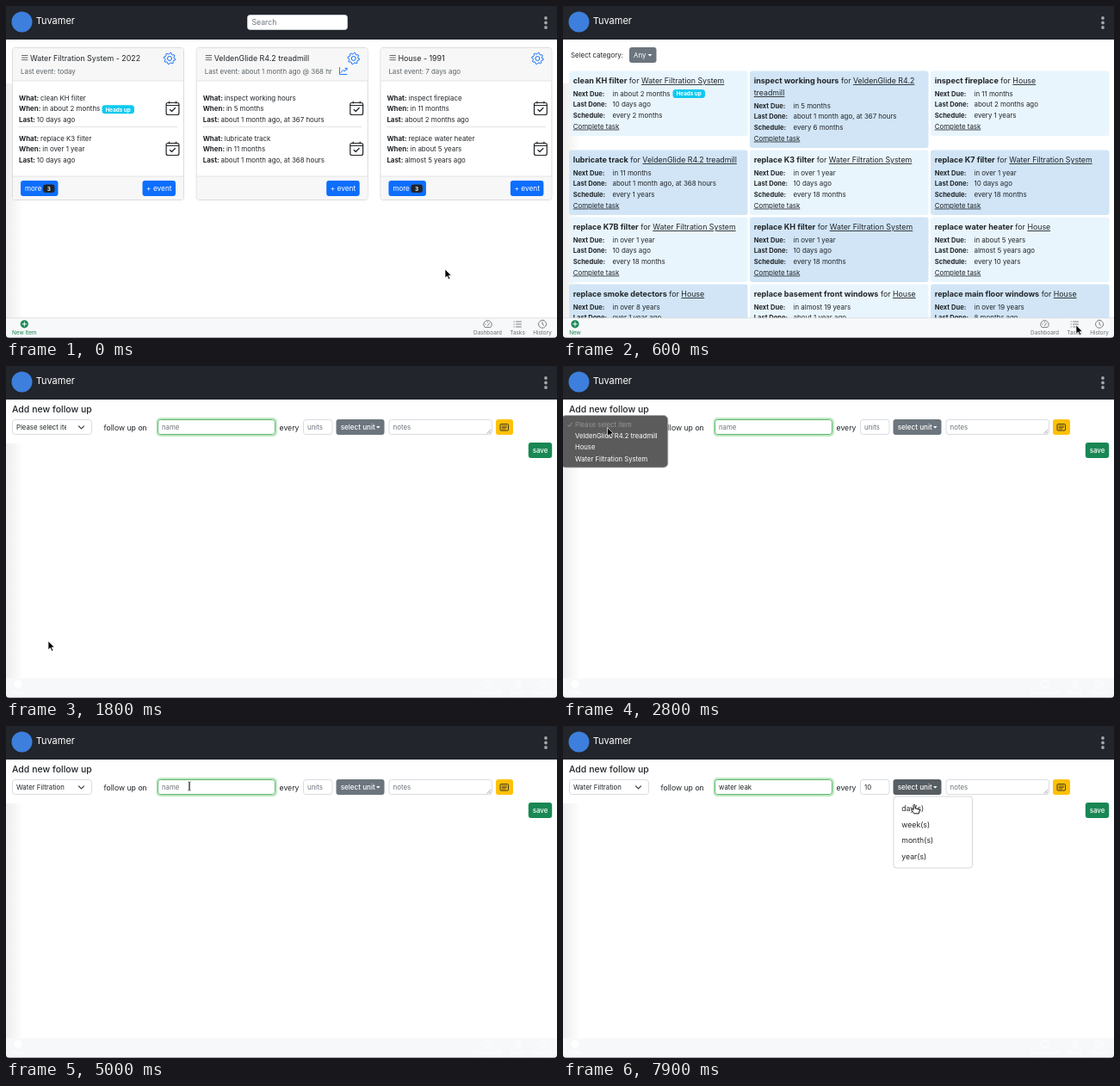
Animation of 640x386 px, one loop 8 s. Source, as an HTML page:

```html
<!DOCTYPE html>
<html lang="en">
<head>
<meta charset="utf-8">
<title>Home upkeep tracker</title>
<style>
html, body { margin: 0; width: 100%; height: 100%; overflow: hidden; background: #fff; }
svg { display: block; width: 640px; height: 386px; }
text { font-family: Inter, 'Noto Sans', sans-serif; white-space: pre; }
.b { font-weight: 700; }
.u { text-decoration: underline; text-decoration-thickness: .6px; text-decoration-color: #6b7681; }
</style>
</head>
<body>
<svg id="stage" viewBox="0 0 640 386" xmlns="http://www.w3.org/2000/svg"></svg>
<script>
const INK = '#212529', GREY = '#6c757d', BLUE = '#0d6efd', GREEN = '#198754';
const SMALL = 7.9, BASE = 8.7, LOOP = 8000, STEP = 100;
const MILL = 'VeldenGlide R4.2 treadmill', WATER = 'Water Filtration System';

// ---- drawing helpers ----
const rect = (x, y, w, h, fill, rx = 0, more = '') =>
  `<rect x="${x}" y="${y}" width="${w}" height="${h}" rx="${rx}" fill="${fill}" ${more}/>`;
const box = (x, y, w, h, line = '#ced4da', fill = '#fff', more = '') =>
  rect(x + .5, y + .5, w - 1, h - 1, fill, 3, `stroke="${line}" stroke-width=".8" ${more}`);
const text = (x, y, s, size = SMALL, fill = INK, more = '') =>
  `<text x="${x}" y="${y}" font-size="${size}" fill="${fill}" ${more}>${s}</text>`;
const path = (d, color = INK, w = 1, more = '') =>
  `<path d="${d}" fill="none" stroke="${color}" stroke-width="${w}" stroke-linecap="round" stroke-linejoin="round" ${more}/>`;
const group = (id, body, more = '') => `<g id="${id}" ${more}>${body}</g>`;
const bold = (s, size = SMALL) => `<tspan class="b" font-size="${size}">${s}</tspan>`;
const link = s => `<tspan class="u">${s}</tspan>`;
const mid = 'text-anchor="middle"';
const badge = (x, y) => rect(x, y, 37.5, 10, '#0dcaf0', 3.5) +
  text(x + 18.7, y + 7.4, 'Heads up', 6.3, '#fff', mid + ' font-weight="700"');

function gear(cx, cy) {
  let d = '';
  for (let i = 0; i < 32; i++) {
    const r = i % 4 < 2 ? 6.7 : 5.2, a = (i + .5) * Math.PI / 16;
    d += (i ? 'L' : 'M') + (cx + r * Math.cos(a)).toFixed(2) + ' ' + (cy + r * Math.sin(a)).toFixed(2);
  }
  return path(d + 'Z', BLUE) + `<circle cx="${cx}" cy="${cy}" r="2.5" fill="none" stroke="${BLUE}"/>`;
}

const calendar = (x, y) => rect(x + .6, y + 1.5, 14.8, 14, 'none', 2, `stroke="${INK}" stroke-width="1.2"`) +
  path(`M${x + 1} ${y + 4.5}h14M${x + 4} ${y}v2M${x + 12} ${y}v2M${x + 5} ${y + 9.5}l2 2l4-4`, INK, 1.2);

// ---- dashboard ----
function itemCard(x, title, sub, jobs, more) {
  let s = box(x, 48, 200, 178, '#d4d4d4') +
    rect(x + 1, 49, 198, 38, '#f7f7f7', 2) + rect(x + 1, 198, 198, 27, '#f7f7f7', 2) +
    path(`M${x + 1} 87h198M${x + 1} 198h198`, '#dcdcdc', .8) +
    path(`M${x + 11.5} 57.5h6.5m-6.5 2.6h6.5m-6.5 2.6h6.5`, '#444', .8) +
    text(x + 21, 63.5, title, 8.9) + text(x + 10, 79, sub, SMALL, '#5c6368') + gear(x + 183, 61);
  jobs.forEach((job, i) => {
    const y = 110 + i * 47;
    ['What: ', 'When: ', 'Last: '].forEach((label, k) =>
      s += text(x + 8, y + k * 12.4, bold(label) + job[k]));
    s += calendar(x + 178.5, y + 1);
  });
  s += path(`M${x + 8} 140.5h184`, '#dcdcdc', .8);
  if (more) s += rect(x + 10, 203, 43.5, 18, BLUE, 3) + text(x + 15, 215, 'more', 8, '#fff') +
    rect(x + 36, 207.5, 13.5, 9.5, INK, 3) + text(x + 42.7, 214.7, '3', 6.4, '#fff', mid + ' class="b"');
  return s + rect(x + 151.5, 203, 38.5, 18, BLUE, 3) + text(x + 170.8, 215, '+ event', 8.3, '#fff', mid);
}

const dashboard =
  itemCard(7, WATER + ' - 2022', 'Last event: today', [
    ['clean KH filter', 'in about 2 months', '10 days ago'],
    ['replace K3 filter', 'in over 1 year', '10 days ago']], true) + badge(111.5, 115.3) +
  itemCard(220.7, MILL, 'Last event: about 1 month ago @ 368 hr', [
    ['inspect working hours', 'in 5 months', 'about 1 month ago, at 367 hours'],
    ['lubricate track', 'in 11 months', 'about 1 month ago, at 368 hours']], false) +
  path('M387.5 71.5v8h8.5M389 77.5l2.4-3l1.8 1.4l2.8-3.6m-2 0h2v2', BLUE, .9) +
  itemCard(434.4, 'House - 1991', 'Last event: 7 days ago', [
    ['inspect fireplace', 'in 11 months', 'about 2 months ago'],
    ['replace water heater', 'in about 5 years', 'almost 5 years ago']], true) +
  box(280, 10, 117, 18) + text(285.5, 22, 'Search', BASE, GREY);

// ---- task list ----
const tasks = [
  ['clean KH filter', WATER, 'in about 2 months', '10 days ago', 'every 2 months'],
  ['inspect working hours', MILL, 'in 5 months', 'about 1 month ago, at 367 hours', 'every 6 months'],
  ['inspect fireplace', 'House', 'in 11 months', 'about 2 months ago', 'every 1 years'],
  ['lubricate track', MILL, 'in 11 months', 'about 1 month ago, at 368 hours', 'every 1 years'],
  ['replace K3 filter', WATER, 'in over 1 year', '10 days ago', 'every 18 months'],
  ['replace K7 filter', WATER, 'in over 1 year', '10 days ago', 'every 18 months'],
  ['replace K7B filter', WATER, 'in over 1 year', '10 days ago', 'every 18 months'],
  ['replace KH filter', WATER, 'in over 1 year', '10 days ago', 'every 18 months'],
  ['replace water heater', 'House', 'in about 5 years', 'almost 5 years ago', 'every 10 years'],
  ['replace smoke detectors', 'House', 'in over 8 years', 'over 1 year ago', 'every 10 years'],
  ['replace basement front windows', 'House', 'in almost 19 years', 'about 1 year ago', 'every 20 years'],
  ['replace main floor windows', 'House', 'in over 19 years', '8 months ago', 'every 20 years']];

function taskCard([name, item, ...vals], i) {
  const x = 7 + (i % 3) * 210, row = Math.floor(i / 3), y = [75.5, 167.5, 245.5, 323.5][row];
  const wrap = i === 1, drop = wrap ? 14 : 0, at = y + 14.5;
  const parts = wrap ? [item.replace(' treadmill', ''), 'treadmill'] : [item];
  let s = rect(x, y, 207.5, 75.5 + drop, i % 2 ? '#d1e5f6' : '#e9f5fc', 3) +
    text(x + 4.7, at, bold(name, 9.05) + ' for ' + link(parts[0]), 8.8);
  if (wrap) s += text(x + 4.7, at + 14, link(parts[1]), 8.8);
  ['Next Due:', 'Last Done:', 'Schedule:'].forEach((label, k) => {
    const ly = at + drop + 15 + k * 12.4;
    s += text(x + 4.7, ly, label, 7.6, INK, 'class="b"') + text(x + 50.5, ly, vals[k]);
  });
  return s + text(x + 4.7, at + drop + 52.6, link('Complete task'));
}

const taskPage = text(9, 60, 'Select category:') + rect(77, 48, 31.5, 18, GREY, 3) +
  text(82, 60, 'Any', SMALL, '#fff') + '<path d="M98.5 56h5l-2.5 2.6z" fill="#fff"/>' +
  tasks.map(taskCard).join('') + badge(127.5, 97);

// ---- form ----
const form = text(7, 53.8, 'Add new follow up', 10.5, INK, 'font-weight="500"') +
  rect(5.5, 60.5, 96, 21, 'none', 4.5, `id="selRing" stroke="${BLUE}" stroke-width="3"`) +
  box(7, 62, 93, 18) + text(12, 74, '', 7.8, INK, 'id="selText" clip-path="url(#selClip)"') +
  path('M84.5 69.8l3 3l3-3', '#343a40', 1.2) +
  text(113.5, 74.5, 'follow up on', BASE) +
  rect(175.5, 61, 138.5, 20, 'none', 4, 'stroke="#4bbf5b" stroke-opacity=".35" stroke-width="2"') +
  box(176, 62, 137, 18, '#35a548') + text(181, 74, '', 7.8, INK, 'id="name"') +
  rect(0, 66, 1, 10, '#111', 0, 'id="caret"') +
  text(317.5, 74.5, 'every', BASE) +
  rect(344.3, 60.5, 36, 21, 'none', 4.5, `id="unitRing" stroke="${BLUE}" stroke-width="3"`) +
  box(345, 62, 34.5, 18) + text(350, 74, '', SMALL, INK, 'id="units"') +
  rect(383.5, 62, 56, 18, GREY, 3, 'id="unitBtn"') +
  text(388.7, 74, 'select unit', 8.1, '#fff', 'font-weight="500"') + '<path d="M430 70h4.6l-2.3 2.5z" fill="#fff"/>' +
  box(444.5, 62, 120.5, 18) + text(449.5, 74, 'notes', SMALL, GREY) +
  path('M559 78.3l4-4M561.5 78.3l1.6-1.6', '#777', .7) +
  rect(569, 62, 20, 18, '#ffc107', 3) + rect(574, 67.6, 9.5, 7.4, 'none', 1, `stroke="${INK}" stroke-width=".9"`) +
  path('M576 69.8h5.5m-5.5 1.6h5.5m-5.5 1.6h4', INK, .7) +
  rect(606.8, 89, 27.4, 18, GREEN, 3) + text(620.5, 101, 'save', SMALL, '#fff', mid + ' font-weight="500"') +
  group('unitMenu', box(383.5, 81.5, 92.5, 84, '#cfcfcf') +
    ['day(s)', 'week(s)', 'month(s)', 'year(s)'].map((s, i) => text(393.3, 99 + i * 18.5, s, BASE)).join('')) +
  group('popup', rect(-2, 57.5, 123.8, 60.5, '#5b5b5b', 5, 'stroke="#a5a5a5" stroke-width=".8"') +
    rect(2, 0, 117, 13.2, '#ff8a4f', 2.5, 'id="hover"') + path('M5.8 68.6l1.6 2l3-4.6', '#969696', .9) +
    ['Please select item', MILL, 'House', WATER].map((s, i) =>
      text(14, 71 + i * 13.2, s, 7.7, i ? '#fff' : '#969696')).join(''));

// ---- frame around the pages ----
const header = rect(0, 0, 640, 39, '#22252b') + '<circle cx="18.5" cy="18.5" r="12" fill="#3d7fdc"/>' +
  text(34.7, 21.3, 'Tuvamer', 11, '#fff') +
  [14, 19.5, 25].map(y => `<circle cx="627" cy="${y}" r="1.9" fill="#a3a5a8"/>`).join('');

const tab = (x, s, icon) => path(icon, 'currentColor', .9) + text(x, 381.5, s, 6.4, 'currentColor', mid);
const bar = rect(0, 363, 640, 23, '#f7f8f9') + path('M0 362.7h640', '#d9dcde', .8, 'id="barLine"') +
  rect(6.3, 363, 17.4, 21.5, '#e8eefb', 3, 'id="newRing" stroke="#4a78d8" stroke-width="1.5"') +
  group('newTab', '<circle cy="369.8" r="4.6" fill="currentColor"/>' +
    path('M-2.3 369.8h4.6M0 367.5v4.6', '#fff', 1) + text(0, 381.5, '', 6.4, 'currentColor', mid + ' id="newText"')) +
  group('tabs',
    tab(559.5, 'Dashboard', 'M556 373.3a4.6 4.6 0 1 1 7 0zM559.5 371.5l2-2.6M556.8 370h.4M559.5 367.2v.4') +
    tab(594, 'Tasks', 'M592.5 367h6m-6 3h6m-6 3h6M590 367h.4M590 370h.4M590 373h.4') +
    tab(623, 'History', 'M623 365.3a4.5 4.5 0 1 0 .1 0M623 367.5v2.6l1.8 1.2'));

const newMenu = box(7, 316.5, 92.5, 46, '#cfcfcf') + text(17, 333.4, 'Follow up', BASE) + text(17, 352, 'Task', BASE);

const cursors =
  '<path id="arrow" d="M0 0v10.2l2.4-2.2l1.7 3.8l1.7-.8l-1.7-3.6h3.2z" fill="#000" stroke="#fff" stroke-width=".7"/>' +
  '<path id="hand" d="M-1 .6c0-1.6 2-1.6 2 0v3.2l4 .9q1.4.4 1.1 1.9l-.8 3.2h-5.4l-3.2-4c-.6-1.2.7-1.9 1.5-1l.8.8z" fill="#fff" stroke="#000" stroke-width=".9"/>' +
  '<path id="beam" d="M-1.6-5q1.6 0 1.6 1v8q0 1-1.6 1M1.6-5q-1.6 0-1.6 1v8q0 1 1.6 1" fill="none" stroke="#222" stroke-width=".8"/>';

const svg = document.getElementById('stage');
svg.innerHTML = `<defs><linearGradient id="edge"><stop stop-color="#000" stop-opacity=".07"/>
  <stop offset="1" stop-color="#000" stop-opacity="0"/></linearGradient>
  <clipPath id="selClip"><rect x="10" y="62" width="60" height="18"/></clipPath></defs>` +
  rect(0, 0, 640, 386, '#fff') + rect(0, 90, 20, 273, 'url(#edge)') + header +
  group('tasks', taskPage) + group('dash', dashboard) + group('form', form) + bar +
  group('newMenu', newMenu) + path('M0 385.7h640', '#5a5c5f', .6) +
  '<path d="M0 382v4h4q-4 0-4-4zM640 382v4h-4q4 0 4-4z" fill="#111"/>' + group('cursor', cursors);

const el = {};
svg.querySelectorAll('[id]').forEach(n => el[n.id] = n);
const show = (id, o) => { el[id].style.display = o ? '' : 'none'; el[id].style.opacity = +o; };
const set = (id, k, v) => el[id].setAttribute(k, v);

// ---- motion ----
// time, x, y, pointer shape from then on
const route = [
  [0, 510, 306, 'arrow'], [400, 596, 371, 'arrow'], [600, 596, 371, 'arrow'], [1300, 14, 368, 'hand'],
  [1400, 14, 368, 'hand'], [1600, 49, 329, 'hand'], [1700, 49, 329, 'arrow'], [2600, 50, 58, 'arrow'],
  [2800, 51.5, 71.5, 'arrow'], [3100, 50, 80, 'arrow'], [3400, 50, 80, 'arrow'], [3800, 49.5, 107, 'arrow'],
  [3900, 49.5, 107, 'arrow'], [4300, 213, 70, 'beam'], [6400, 213, 70, 'beam'], [6700, 402, 59, 'arrow'],
  [6900, 360, 71, 'beam'], [7200, 360, 71, 'arrow'], [7500, 409, 72, 'hand'], [7600, 409, 72, 'hand'],
  [7900, 408, 92, 'hand'], [8000, 408, 92, 'hand']];

const ramp = (t, a, b) => Math.min(1, Math.max(0, (t - a) / (b - a)));

function pointer(t) {
  const i = route.findIndex((k, n) => n + 1 === route.length || t < route[n + 1][0]);
  const a = route[i], b = route[i + 1] || a, p = b === a ? 0 : ramp(t, a[0], b[0]), e = p * p * (3 - 2 * p);
  return [a[1] + (b[1] - a[1]) * e, a[2] + (b[2] - a[2]) * e, a[3]];
}

function typed(t) {
  if (t < 5400) return 0;
  if (t < 6100) return Math.floor((t - 5400) / 100) + 1;
  return t < 6300 ? 9 : 10;
}

function draw(t) {
  const inForm = t >= 1800, inTasks = t >= 600 && !inForm;
  show('dash', t < 600);
  show('tasks', inTasks);
  show('form', inForm);

  const open = t >= 1400 && !inForm;
  show('newMenu', open);
  show('newRing', open);
  el.newText.textContent = t < 600 ? 'New Item' : 'New';
  set('newTab', 'transform', `translate(${t < 600 ? 21.3 : 14} 0)`);
  el.newTab.style.color = inForm ? '#fff' : GREEN;
  el.tabs.style.color = inForm ? '#fff' : '#6a7077';
  show('barLine', !inForm);

  const [x, y, shape] = pointer(t);
  set('cursor', 'transform', `translate(${x.toFixed(2)} ${y.toFixed(2)})`);
  show('cursor', !(t >= 5400 && t < 6500) && !(t >= 7100 && t < 7300));
  ['arrow', 'hand', 'beam'].forEach(s => show(s, s === shape));

  show('popup', t >= 2600 ? 1 - ramp(t, 3800, 4000) : 0);
  const row = Math.floor((y - 61.5) / 13.2);
  const over = t >= 2600 && t < 4000 && row > 0 && row < 4;
  show('hover', over);
  if (over) set('hover', 'y', 61.5 + row * 13.2);
  el.selText.textContent = t < 4000 ? 'Please select item' : WATER;
  show('selRing', t >= 2600 ? .25 * (1 - ramp(t, 4300, 4700)) : 0);

  const n = typed(t);
  el.name.textContent = n ? 'water leak'.slice(0, n) : 'name';
  set('name', 'fill', n ? INK : GREY);
  show('caret', t >= 4400 && t < 6500 && !(t >= 5000 && t < 5100));
  if (inForm) set('caret', 'x', 181 + (n ? el.name.getComputedTextLength() + .3 : 0));

  el.units.textContent = t < 7100 ? 'units' : t < 7200 ? '1' : '10';
  set('units', 'fill', t < 7100 ? GREY : INK);
  show('unitRing', .25 * ramp(t, 6700, 6900) * (1 - ramp(t, 7500, 7700)));
  set('unitBtn', 'fill', t >= 7500 ? '#565e64' : GREY);
  show('unitMenu', t >= 7600);
}

const start = performance.now();
function tick(now) {
  const t = Math.max(0, now - start) % LOOP;
  draw(Math.floor(t / STEP) * STEP);
  requestAnimationFrame(tick);
}
draw(0);
requestAnimationFrame(tick);
</script>
</body>
</html>
```
